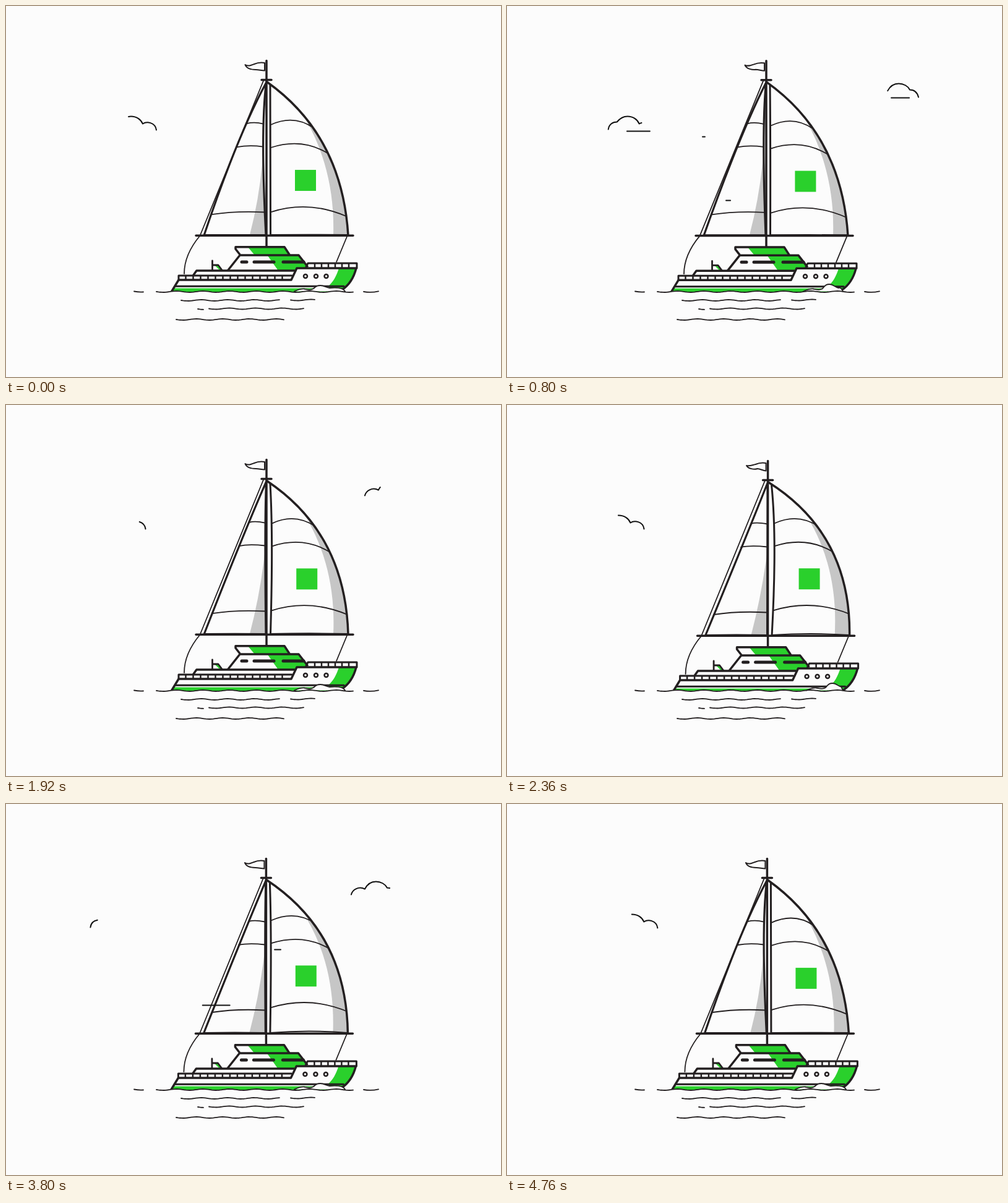
An HTML page for the animation above (4.8 s loop, 800 by 600 pixels).

```html
<!DOCTYPE html>
<html lang="en">
<head>
<meta charset="utf-8">
<title>Sailing yacht</title>
<style>
  html, body { margin: 0; width: 100%; height: 100%; overflow: hidden; background: #fcfcfc; }
  svg { display: block; width: 100%; height: 100%; }
  path { fill: none; stroke: #231f20; stroke-linecap: round; stroke-linejoin: round; }
  .thin path, path.thin { stroke-width: 1.8; }
  .thick path, path.thick { stroke-width: 3.5; }
  .paper { fill: #fcfcfc; }
  path.green, path.grey, path.mask { stroke: none; }
  .green { fill: #2ad02c; }
  .grey { fill: #c6c6c6; }
  .mask { fill: #fcfcfc; }
  #sky path { stroke: #111; stroke-width: 2; }
</style>
</head>
<body>
<svg viewBox="0 0 800 600">
  <g id="boat">
    <g class="thin">
      <path d="M416 121L313.500 371.500Q288 402 288 433M551 373L534 414"/>
    </g>

    <path id="jib" class="paper" stroke="none"/>
    <path id="jibShade" class="grey"/>
    <path id="jibBands" class="thin"/>
    <path id="jibEdge" stroke-width="3.2"/>
    <path id="jibFoot" stroke-width="2"/>

    <clipPath id="inMain"><path id="mainClip"/></clipPath>
    <g clip-path="url(#inMain)">
      <path id="mainShade" class="grey"/>
      <path id="mainBands" class="thin"/>
    </g>
    <path id="mainLuff" stroke-width="3"/>
    <path id="mainLeech" class="thick"/>
    <path id="mainFoot" stroke-width="2"/>
    <rect id="badge" class="green" width="34" height="34"/>

    <path id="flag" class="paper" stroke-width="2"/>
    <g class="thick">
      <path d="M421 88.500V402" />
      <path d="M413 119.500H429M307 371.200H561" />
    </g>

    <path class="mask" d="M370 390H450L458 403H473L487 422L484 436H303L308 428H359L378 403Z"/>
    <path class="green" d="M391 390H450L458 403H402ZM423 404H473L487 421L484 428H440Z"/>
    <path class="green" d="M338 420H343L349 427H345Z"/>
    <g class="thick">
      <path d="M378 402L371 393V389.700H450L458 402M359 427L378 403H473L487 421"/>
      <path d="M303 435L308 428H466"/>
    </g>
    <path d="M381 414H389M401 414H433M448 414H481" stroke-width="5"/>
    <path d="M333.500 412V427M334 419H343L349 427" stroke-width="2.800"/>

    <path class="mask" d="M279 436H463L470 424H566C562 440 555 451 543 459L540 468H264L279 443Z"/>
    <path class="green" d="M538 424H566C562 440 555 451 543 459L520 454C529 446 534 437 538 424Z"/>
    <path class="green" d="M271 456.500H522V468H264Z"/>
    <path id="posts" stroke-width="2.500"/>
    <path d="M279 443V436H462M567 424V416H488L485 422M274 453.300H546" stroke-width="3"/>
    <path class="thick" d="M265 466L279 443H461L470 424H566C562 440 555 451 543 459"/>
    <path id="ports" class="paper" stroke-width="2.500"/>
  </g>

  <path id="sea" class="mask"/>
  <path id="spray" class="paper thin"/>
  <g class="thin"><path id="waves"/></g>

  <g id="sky" transform="translate(0 .5)">
    <path id="cloudL" pathLength="1" d="M0 199C1 191 7 187 14 187C19 181 25 178 31 178C40 178 47 183 50 190C56 186 70 187 72 200"/>
    <path id="cloudR" pathLength="1" d="M0 146C2 138 12 132 22 137C26 129 33 125 40 125C48 125 55 129 58 135C65 135 70 139 72 147"/>
    <path id="wind"/>
  </g>
</svg>
<script>
const LOOP = 4800, STEP = 40, BOB = 960, CLOUD = 2400, WIND = 0.31;
const el = id => document.getElementById(id);
const draw = (id, d) => el(id).setAttribute('d', d);
const clamp = (v, lo = 0, hi = 1) => Math.min(hi, Math.max(lo, v));
const mod = (v, n) => (v % n + n) % n;

// Smooth periodic curve through [time, value] keys.
function track(keys, period) {
  const n = keys.length;
  const key = i => [keys[mod(i, n)][0] + Math.floor(i / n) * period, keys[mod(i, n)][1]];
  const slope = i => {
    const [a, b] = [key(i - 1), key(i + 1)];
    return (b[1] - a[1]) / (b[0] - a[0]);
  };
  return time => {
    const t = mod(time, period);
    let i = n - 1;
    while (keys[i][0] > t) i--;
    const [t0, v0] = key(i), [t1, v1] = key(i + 1);
    const h = t1 - t0, u = (t - t0) / h, w = 1 - u;
    return v0 * (1 + 2 * u) * w * w + v1 * u * u * (3 - 2 * u)
      + h * u * w * (slope(i) * w - slope(i + 1) * u);
  };
}

const sailTrack = (...v) =>
  track([0, 800, 1480, 2360, 3080, 3800].map((t, i) => [t, v[i]]), LOOP);
const jibFlex = sailTrack(0, .25, .4, 1, 1, .8);
const mainFlex = sailTrack(0, .1, .1, 1, .95, .35);
const sailLift = sailTrack(0, 1.2, 1.3, -2.8, -3.7, -3.8);
const crest = track([[0, 508], [200, 518], [440, 526], [520, 518], [800, 521], [920, 508]], BOB);

// Gusts: height, spawn x, end x, start time, length.
const gusts = [
  [148, 737, 590, 426, 29], [202, 290, 170, 490, 37],
  [211, 400, 316, 445, 30], [314, 440, 354, 481, 20],
  [325, 420, 300, 1157, 48], [235, 445, 360, 1464, 30],
  [268, 280, 203, 2757, 30], [246, 460, 383, 2770, 30],
  [314, 440, 354, 2872, 20], [325, 420, 300, 3470, 44],
  [235, 444, 360, 3768, 30]
];

function wave(x0, x1, y) {
  let d = '';
  for (let x = x0; x <= x1; x += 3) {
    d += `${d ? 'L' : 'M'}${x} ${(y + Math.sin((x - x0) / 6.85)).toFixed(2)}`;
  }
  return d;
}

function setup() {
  let posts = '';
  for (let x = 290.5; x < 456; x += 12) posts += `M${x} 437V442`;
  for (let x = 499; x < 562; x += 11) posts += `M${x} 417V423`;
  draw('posts', posts);
  draw('ports', [484, 501, 517.5].map(x => `M${x - 3} 437a3 3 0 1 1 6 0a3 3 0 1 1-6 0Z`).join(''));
  const lines = [
    [243, 562, 462], [283, 442, 476], [460, 499, 475.5],
    [310, 321, 490], [328, 481, 489.5], [275, 450, 507]
  ].map(a => wave(...a));
  draw('waves', lines.join('') + 'M207 461.5Q214 463 222 462.5M578 462Q590 464 602 461.300');
  draw('sea', lines[0] + 'V474H243Z');
}

function drawJib(s) {
  const luff = `M420.5 124Q${374 + 12.5 * s} 210 320 371`;
  const leechX = 411 + 9.5 * s, r = 415.7 + 4.3 * s;
  draw('jib', `${luff}L420 370Q${leechX} 200 420.5 124Z`);
  draw('jibEdge', `${luff}M420.5 124Q${leechX} 200 420 370`);
  draw('jibShade', `M${r} 235Q411 305 394 370H420Q${r + 2} 310 ${r} 235Z`);
  draw('jibBands', `M${389 + 5 * s} 190Q402 187 ${r} 190.500`
    + `M${373.5 + 4 * s} 228Q393 224.500 ${r} 227.500M${332.5 + s} 337Q372 331 419 333.500`);
  draw('jibFoot', `M322 370Q370 ${370 - s} 419 370`);
}

// s bows the luff, d shifts the seams; both push the leech outwards.
function drawMain(s, d) {
  const bulge = 8.5 * s - 1.3 * d;
  const leech = `M422 123Q${543 + bulge} ${209 - 2 * s} 553 371`;
  draw('mainLeech', leech);
  draw('mainClip', leech + 'H427V128Z');
  draw('mainLuff', `M427 128Q${427 + 9 * s} 215 427.500 370`);
  draw('mainShade', `M${487 + 3 * s} 188Q${532 + 3 * s} ${270 + d} 529 371H560V188Z`);
  const band = (x0, y0, cx, cy, x1, y1) =>
    `M${x0} ${y0 + d}Q${cx + bulge / 3} ${cy + d} ${x1 + bulge / 2} ${y1 + d}`;
  draw('mainBands', band(428 + 4 * s, 192, 465, 175, 497, 197)
    + band(428 + 4 * s, 229, 480, 212, 523, 240)
    + band(428.5 + 2 * s, 333, 490, 313.5, 551, 340.5));
  draw('mainFoot', `M428 370Q490 ${369.5 + Math.min(0, d) * 1.2} 552 370`);
  el('badge').setAttribute('x', 467 + 4 * s);
  el('badge').setAttribute('y', 265 + d);
}

function drawFlag(phase) {
  const k = (1 - Math.cos(phase)) / 2;
  draw('flag', `M386.5 ${95 + k}C392 ${98 - k} 396 ${96 - k} 401 94C407 91.5 412 91 418 92V104.500`
    + `C413 104.500 409 ${103 - 2 * k} 404 ${103 - 2 * k}C399 103 389 ${102 - k} 386.5 ${95 + k}Z`);
}

function drawSpray(x) {
  const lift = clamp((x - 508) / 10), top = 452 - 2 * lift, end = 548 - 5 * lift;
  draw('spray', `M${x - 42} 461.500C${x - 36} 459 ${x - 32} 457 ${x - 26} 457.500`
    + `C${x - 19} 459 ${x - 16} 460 ${x - 11} 457C${x - 6} ${top} ${x - 3} ${top} ${x} ${top}`
    + `C${x + 7} ${top} ${x + 10} 456 ${x + 15} 456Q${end - 4} 454 ${end} 461.500`);
}

function drawCloud(id, x, phase, headStart, tailStart) {
  const a = clamp(1 - (phase - headStart) / 1100), b = clamp(1 - (phase - tailStart) / 1100);
  const path = el(id);
  path.setAttribute('visibility', b - a > .003 ? 'visible' : 'hidden');
  path.setAttribute('transform', `translate(${x} 0)`);
  path.setAttribute('stroke-dasharray', `${b - a} 3`);
  path.setAttribute('stroke-dashoffset', -a);
}

function drawWind(t) {
  let d = '';
  for (const [y, spawn, end, start, len] of gusts) {
    const lead = spawn - WIND * (t - start);
    const l = clamp(lead, end, spawn), r = clamp(lead + len, end, spawn);
    if (r - l > .5) d += `M${l} ${y}H${r}`;
  }
  draw('wind', d);
}

function render(t) {
  const bob = t / BOB * 2 * Math.PI;
  const dx = 2.3 * Math.sin(bob), dy = 1 - Math.cos(bob + .19);
  el('boat').setAttribute('transform', `translate(${dx.toFixed(3)} ${dy.toFixed(3)})`);
  drawJib(jibFlex(t));
  drawMain(mainFlex(t), sailLift(t));
  drawFlag(bob);
  drawSpray(crest(t));
  const early = t > 4300 ? t - LOOP : t;
  drawCloud('cloudL', 171 - .0091 * early, mod(t + 670, CLOUD) - 670, -670, 510);
  drawCloud('cloudR', 602.4 - .0117 * t, mod(t, CLOUD), 30, 1210);
  drawWind(t);
}

const begin = performance.now();
function tick() {
  const t = (performance.now() - begin) % LOOP;
  render(Math.floor(t / STEP) * STEP);
  requestAnimationFrame(tick);
}
setup();
render(0);
requestAnimationFrame(tick);
</script>
</body>
</html>
```
